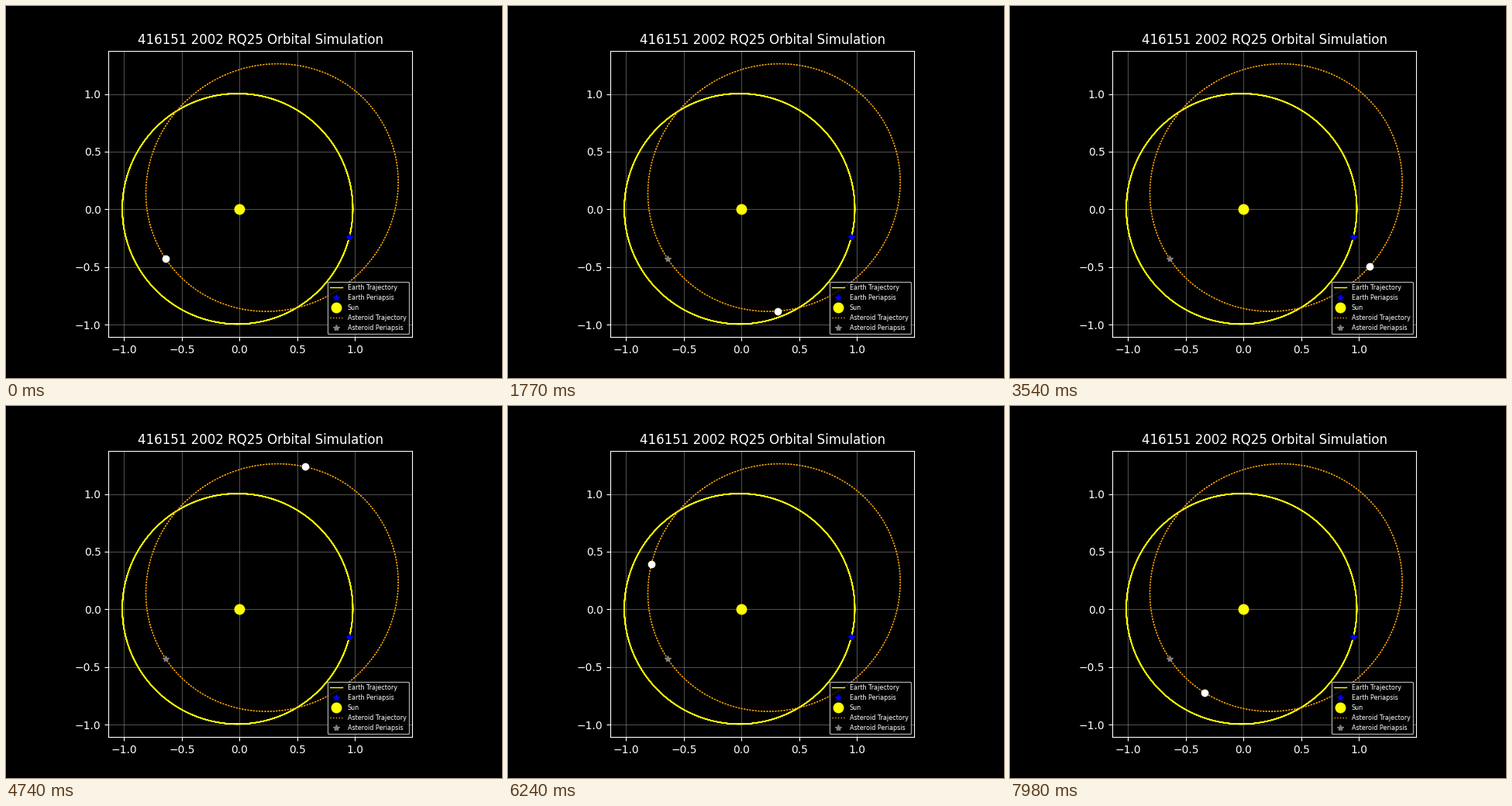
Animation of 640 by 480 pixels, one loop 8 s. Source, as a matplotlib script:

```python
import numpy as np
import matplotlib.pyplot as plt
from matplotlib.animation import FuncAnimation

plt.style.use("dark_background")

STEPS = 400          # drawn frames per loop
INTERVAL = 20        # ms
PERIOD = 67.262      # asteroid period, in 30 ms steps


def orbit(mean, a, e, peri):
    """Clockwise Kepler orbit around the Sun: mean anomaly to x, y."""
    mean = np.asarray(mean, dtype=float)
    ecc = mean + e * np.sin(mean)
    for _ in range(8):
        ecc = ecc - (ecc - e * np.sin(ecc) - mean) / (1 - e * np.cos(ecc))
    u = a * (np.cos(ecc) - e)
    v = -a * np.sqrt(1 - e * e) * np.sin(ecc)
    c, s = np.cos(peri), np.sin(peri)
    return u * c - v * s, u * s + v * c


def turns(n):
    return np.linspace(0, 2 * np.pi * n, 250 * n)


EARTH = (1.0, 0.0167, np.radians(-14.3))
ASTEROID = (1.1105, 0.306, np.radians(213.6))

fig, ax = plt.subplots(figsize=(6.4, 4.8), dpi=100)
ax.set_aspect("equal")
ax.set_xlim(-1.1357, 1.4960)
ax.set_ylim(-1.1085, 1.3760)
ax.grid(True, alpha=0.3)
ax.set_title("416151 2002 RQ25 Orbital Simulation")

ax.plot(*orbit(turns(4), *EARTH), color="yellow", linewidth=1,
        label="Earth Trajectory")
ax.plot(*orbit([0], *EARTH), "*", color="blue", label="Earth Periapsis")
ax.plot(0, 0, "o", color="yellow", markersize=9, label="Sun")
ax.plot(*orbit(turns(2), *ASTEROID), ":", color="orange", linewidth=1,
        label="Asteroid Trajectory")
ax.plot(*orbit([0], *ASTEROID), "*", color="gray", label="Asteroid Periapsis")
body, = ax.plot([], [], "o", color="white")
ax.legend(loc="lower right", fontsize="xx-small")


def update(k):
    step = (2 * k + 1) // 3
    x, y = orbit([2 * np.pi * step / PERIOD], *ASTEROID)
    body.set_data(x, y)
    return body,


anim = FuncAnimation(fig, update, frames=STEPS, interval=INTERVAL,
                     repeat=True, repeat_delay=0, blit=True)
plt.show()
```
